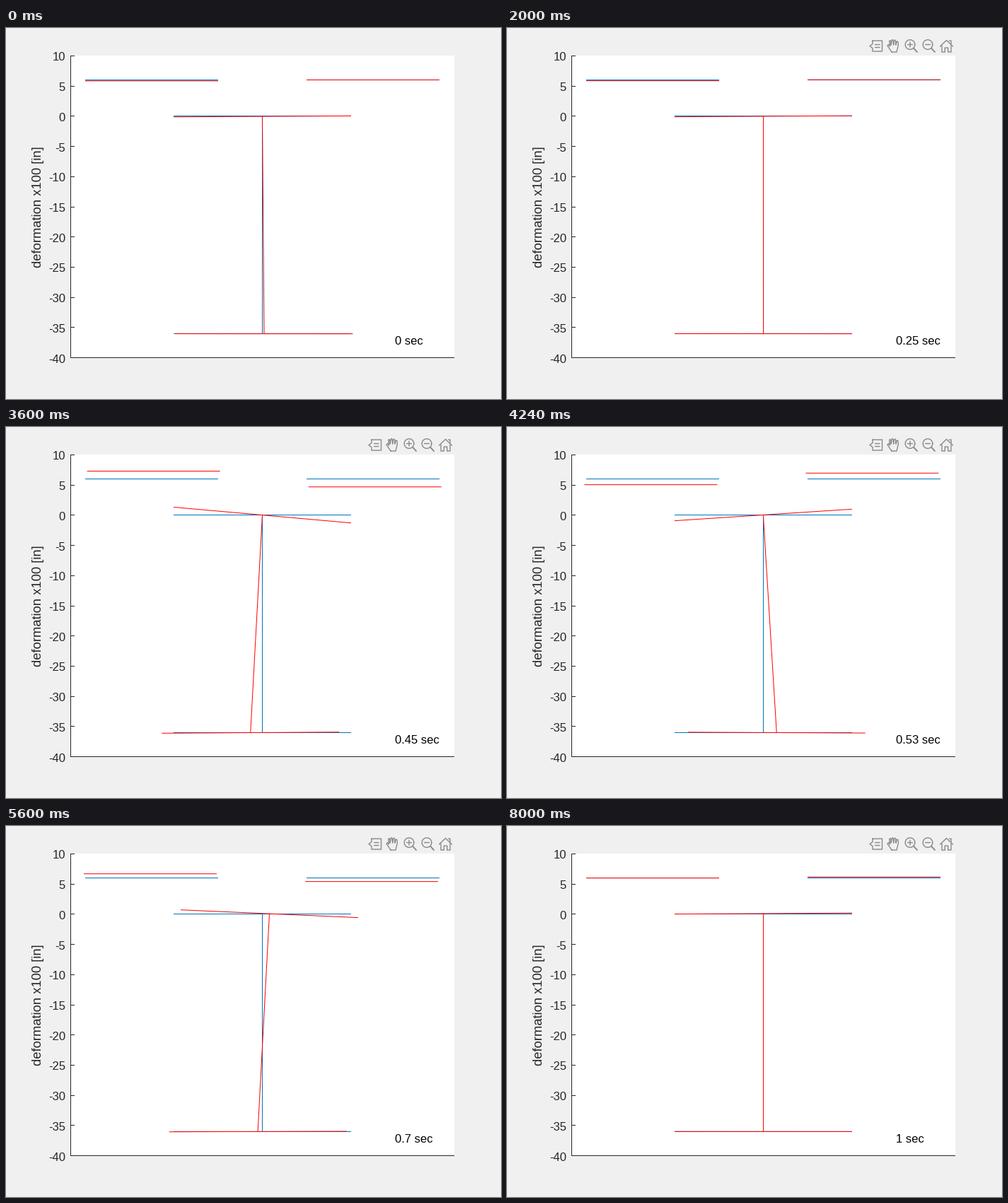
A matplotlib script that plays this animation: 700x525 px, repeating every 8.08 s.

```python
import numpy as np
import matplotlib.pyplot as plt
from matplotlib.animation import FuncAnimation
from matplotlib.patches import Rectangle

W, H, DPI = 700, 525, 100
FRAMES, STEP = 101, 80
PX = 72 / DPI
BLUE, RED, INK, GRAY = "#0072bd", "#ff0000", "#262626", "#8a8a8a"
FONT = "Liberation Sans"
TAU = 2 * np.pi

fig = plt.figure(figsize=(W / DPI, H / DPI), dpi=DPI, facecolor="#f0f0f0")
ax = fig.add_axes([0, 0, 1, 1])
ax.set_xlim(0, W)
ax.set_ylim(H, 0)
ax.axis("off")


def line(xs, ys, color, width=1.0, cap="butt"):
    # pixel centres are given directly, so snapping stays off
    return ax.plot(xs, ys, color=color, lw=width * PX, snap=False,
                   solid_capstyle=cap, solid_joinstyle="round")[0]


def label(x, y, s, size=16.67, color=INK, **kw):
    return ax.text(x, y, s, fontsize=size * PX, color=color, family=FONT,
                   va="baseline", **kw)


def bell(t, centre, width):
    return np.exp(-((t - centre) / width) ** 2)


def quake(t, size, freq, peak):
    """Oscillation that sets in near 0.33 s and dies out by 1 s."""
    onset = 1 / (1 + np.exp(-60 * (t - .33)))
    settle = min(1, 8 * (1 - t))
    return (size * onset * settle * bell(t, .52, .322)
            * np.cos(TAU * freq * (t - peak)))


def motion(t):
    """Displacements in pixels at t seconds."""
    return dict(
        rock=quake(t, 11.9, 7.15, .372) + .7 * np.cos(TAU * 8 * t),
        lift=.6 * np.cos(np.pi * t),
        pad_dx=quake(t, -3.2, 6, .38),
        top_dx=10 * bell(t, .7, .1) * np.cos(TAU * 10 * (t - .7)),
        foot_dx=quake(t, 19.3, 7.57, .525) + 2.5 * np.exp(-25 * t),
    )


def shape(rock=0, lift=0, pad_dx=0, top_dx=0, foot_dx=0):
    """Two pads, top flange, web and bottom flange as (xs, ys)."""
    pad, top, foot, mid = 73.5 + lift, 124.5 + lift, 432.5 + lift / 3, 362.5
    tilt = .07 * rock
    ends = np.array([237, 488])
    return [
        (np.array([112, 300]) + pad_dx, [pad + rock] * 2),
        (np.array([425, 613]) + pad_dx, [pad - rock] * 2),
        (ends + top_dx, [top + rock, top - rock]),
        ([mid + top_dx, mid + foot_dx], [top, foot]),
        (ends + foot_dx, [foot - tilt, foot + tilt]),
    ]


def draw_axes():
    ax.add_patch(Rectangle((91, 39), 543, 428, color="white", lw=0))
    line([91.5, 91.5], [39, 467], INK)
    line([91, 634], [466.5, 466.5], INK)
    for k in range(11):
        y = 39.5 + 42.7 * k
        line([91, 97], [np.floor(y) + .5] * 2, INK)
        label(84, y + 7, str(10 - 5 * k), ha="right")
    label(50, 253.5, "deformation x100 [in]", 18.33, rotation=90,
          rotation_mode="anchor", ha="center")


def draw_toolbar():
    parts = []

    def stroke(*pts, width=1.4):
        parts.append(line(*zip(*pts), GRAY, width, "round"))

    # data tip
    stroke((517, 18), (530.5, 18), (530.5, 33), (517, 33), (517, 28.5),
           (513, 25.5), (517, 22.5), (517, 18))
    for y in (23.5, 27.5):
        stroke((520.5, y), (527, y))

    # hand
    hand = [(544, 34), (538, 25), (539.5, 23.5), (541.5, 26)]
    for k in range(4):
        x, tip = 540.7 + 3.4 * k, 16.5 + .7 * (k - 1.2) ** 2
        hand += [(x, tip + 1), (x + 1, tip), (x + 2, tip + 1), (x + 2.5, 24)]
    stroke(*hand, (551, 34), (544, 34))

    # magnifiers
    a = np.linspace(0, TAU, 41)
    for cx in (570, 595):
        stroke(*zip(cx + 6.8 * np.cos(a), 23.5 + 6.8 * np.sin(a)))
        stroke((cx + 5, 28.5), (cx + 10, 34), width=1.9)
        stroke((cx - 3.5, 23.5), (cx + 3.5, 23.5))
    stroke((570, 20), (570, 27))

    # house
    stroke((612.5, 26), (621.5, 17.3), (630.5, 26))
    stroke((615, 25), (615, 34), (619.3, 34), (619.3, 28), (623.7, 28),
           (623.7, 34), (628, 34), (628, 25))
    stroke((625.5, 18), (628, 18), (628, 22.5))
    return parts


draw_axes()
tools = draw_toolbar()
for xs, ys in shape():
    line(xs, ys, BLUE)
beams = [line(xs, ys, RED) for xs, ys in shape()]
clock = label(549.5, 448, "", color="black")


def update(i):
    t = i / 100
    for beam, (xs, ys) in zip(beams, shape(**motion(t))):
        beam.set_data(xs, ys)
    clock.set_text(f"{t:g} sec")
    for part in tools:
        part.set_alpha(float(np.clip((i - 10.5) / 2, 0, 1)))
    return [*beams, clock, *tools]


anim = FuncAnimation(fig, update, frames=FRAMES, interval=STEP,
                     init_func=lambda: update(0), repeat=True, repeat_delay=0)
plt.show()
```
